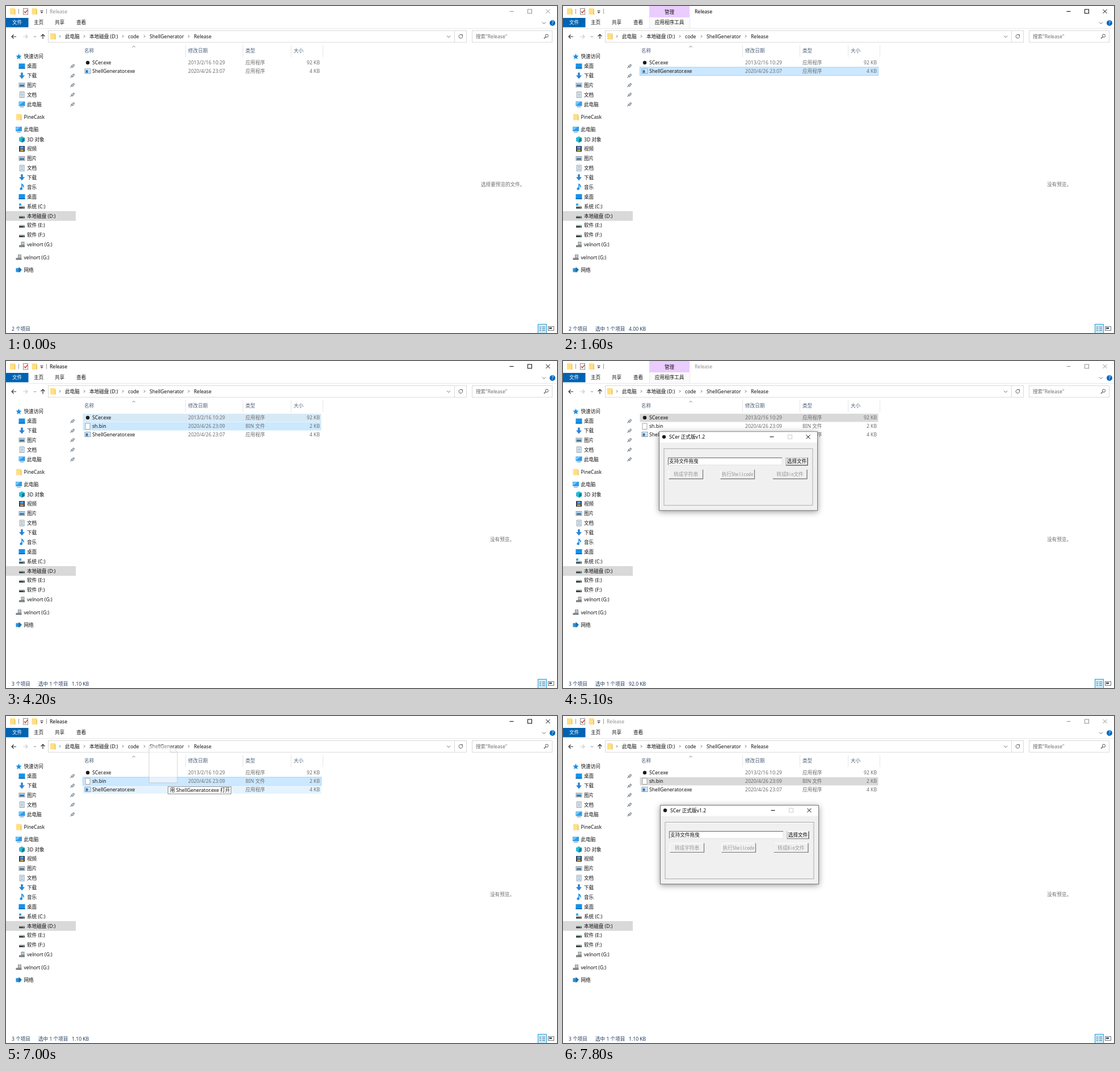
Write an HTML page that moves like this. It is 971 by 577 pixels and loops after 8 s.

```html
<!DOCTYPE html>
<html lang="zh-CN">
<head>
<meta charset="utf-8">
<title>Release</title>
<style>
html, body { margin: 0; width: 100%; height: 100%; overflow: hidden; background: #fff; }
svg { display: block; width: 971px; height: 577px; }
text { font: 8.6px "Noto Sans", "Noto Sans CJK SC", "Noto Sans CJK", sans-serif; fill: #111; }
.dim { fill: #6d6d6d; }
.head { fill: #4c607a; }
.stat { fill: #1e395b; }
.white { fill: #fff; }
.end { text-anchor: end; }
.mid { text-anchor: middle; }
.mono { font-family: "Noto Sans Mono CJK SC", "Noto Sans CJK SC", "Liberation Mono", monospace; }
.off { fill: #999; }
.cap { color: #000; }
.cap text { fill: currentColor; }
.idle .cap { color: #8f8f8f; }
.tiny text { font-size: 2.7px; }
.shadow { filter: drop-shadow(0 2.5px 5.5px rgba(0,0,0,.4)); }
</style>
</head>
<body>
<svg id="stage" viewBox="0 0 971 577"></svg>
<script>
const LOOP = 8000, STEP = 100;

// Drawing helpers; text y is the middle of the line
const text = (x, y, s, cls = '') => `<text x="${x}" y="${y + 3.1}" class="${cls}">${s}</text>`;
const rect = (x, y, w, h, fill, stroke = 'none', width = 1) =>
  `<rect x="${x}" y="${y}" width="${w}" height="${h}" fill="${fill}" stroke="${stroke}" stroke-width="${width}"/>`;
const path = (d, stroke, width = 1, fill = 'none') =>
  `<path d="${d}" stroke="${stroke}" stroke-width="${width}" fill="${fill}"/>`;
const dot = (x, y, r, fill) => `<circle cx="${x}" cy="${y}" r="${r}" fill="${fill}"/>`;
const at = (x, y, s) => `<g transform="translate(${x} ${y})">${s}</g>`;
// Shown only in the given spans: "from-to" or "from-to:opacity"
const during = (spans, s) => `<g data-on="${spans}">${s}</g>`;

let seed = 7;
const rnd = () => (seed = (seed * 16807) % 2147483647) / 2147483647;

const drive = rect(-5, -1, 10, 2, '#c4c8ca') + rect(-5, 1, 10, 3, '#3c4246') + rect(2, 2, 2, 1, '#5fe07a');
const screen = rect(-5.5, -5, 11, 8, '#2f9bea') + path('M-5 -4.5L3 -4.5L-5 2z', 'none', 0, '#73c8fa');
const icons = {
  folder: rect(-4.5, -5.5, 9, 11, '#ffdf85') + rect(3.5, -3.5, 1.5, 9, '#eec058'),
  star: path('M0 -5L1.5 -1.6L5 -1.3L2.4 1.2L3.2 5L0 3L-3.2 5L-2.4 1.2L-5 -1.3L-1.5 -1.6z', 'none', 0, '#1e8fe0'),
  desk: rect(-5.5, -4.5, 11, 9, '#1492ea') + rect(-5.5, 3, 11, 1.5, '#0b63ad'),
  down: path('M-1.8 -5.5H1.8V-.5H5L0 5.5L-5 -.5H-1.8z', 'none', 0, '#2b83d8'),
  pic: rect(-5, -3.5, 10, 7, '#fff', '#8a9299') + rect(-4, -2.5, 8, 3, '#7cbcf0') + rect(-4, 0, 8, 2.5, '#41667e'),
  doc: rect(-3.5, -5, 7.5, 10, '#fff', '#8b969e') + path('M-2 -2.5H2.5M-2 0H2.5M-2 2.5H2.5', '#5b93bd'),
  pc: screen + rect(-3.5, 4, 7, 1.2, '#7e98a8'),
  cube: path('M-5 -3L0 -5.5L5 -3V3L0 5.5L-5 3z', 'none', 0, '#27bcd8') + path('M0 -1L5 -3V3L0 5.5z', 'none', 0, '#127f9c'),
  film: rect(-5, -5, 10, 10, '#333d49') + rect(-3, -4, 6, 4, '#4f9ee8') + rect(-3, 1, 6, 3, '#c99c4d'),
  note: path('M0 2.5V-5Q3.5 -3 3 .5', '#148de8', 1.6) + dot(-1.3, 3, 2.3, '#148de8'),
  drive,
  sys: drive + rect(-5, -5, 4, 3.5, '#2aa9ea'),
  usb: rect(-5, 1, 10, 3.5, '#7d8285') + rect(-1, -4.5, 5, 5, '#c5c9cc', '#8a8f92'),
  net: rect(-5, -3, 8, 7, '#2d8fd5') + path('M0 -5L5.5 0L0 5z', 'none', 0, '#1670b3'),
  page: rect(-4, -5, 8, 10.5, '#fff', '#a5a5a5'),
  app: rect(-5, -4, 10, 8, '#fff', '#7f95a8') + rect(-3.5, -2, 4, 5, '#2279c4') + rect(1.5, -2, 2, 5, '#b6d4ec'),
  tool: dot(0, 0, 3.2, '#1b1b1b')
};
const icon = (name, x, y) => at(x, y, icons[name]);

// Sidebar: indent level, icon, label, y, pinned
const side = [
  [0, 'star', '快速访问', 89], [1, 'desk', '桌面', 106, 1], [1, 'down', '下载', 123, 1], [1, 'pic', '图片', 139.5, 1],
  [1, 'doc', '文档', 156.5, 1], [1, 'pc', '此电脑', 173.5, 1], [0, 'folder', 'PineCask', 196], [0, 'pc', '此电脑', 218],
  [1, 'cube', '3D 对象', 235.5], [1, 'film', '视频', 252], [1, 'pic', '图片', 269], [1, 'doc', '文档', 286],
  [1, 'down', '下载', 302.5], [1, 'note', '音乐', 319.5], [1, 'desk', '桌面', 336.5], [1, 'sys', '系统 (C:)', 353.5],
  [1, 'drive', '本地磁盘 (D:)', 370.5], [1, 'drive', '软件 (E:)', 387], [1, 'drive', '软件 (F:)', 404],
  [1, 'usb', 'velnort (G:)', 421], [0, 'usb', 'velnort (G:)', 443.5], [0, 'net', '网络', 465.5]
];
const pin = path('M-3.5 3.5L-1 1M-2.5 -.5L1 2.8M-1 0L2 -3L3.5 -1.5L.8 1.8', '#87929c', 1.4);
const sidebar = rect(0, 362, 123, 17, '#d9d9d9') + side.map(([lvl, ic, label, y, pinned]) =>
  icon(ic, lvl ? 28 : 22.5, y) + text(lvl ? 37 : 31.5, y, label) + (pinned ? at(117, y, pin) : '')).join('');

const crumbs = [[104, '此电脑'], [147, '本地磁盘 (D:)'], [215, 'code'], [253, 'ShellGenerator'], [331, 'Release']];
const chevron = (x, y) => path(`M${x - 3} ${y - 1.5}L${x} ${y + 1.5}L${x + 3} ${y - 1.5}`, '#666');
const buttons = (x, y, gap, mid = 'currentColor') =>
  path(`M${x - 3.5} ${y}H${x + 3.5}M${x + 2 * gap - 3.5} ${y - 3.5}l7 7m0 -7l-7 7`, 'currentColor') +
  rect(x + gap - 3.5, y - 3.5, 7, 7, 'none', mid);

const frame = rect(0, 0, 971, 577, '#fff') +
  icon('folder', 11.5, 9.5) + path('M22.5 5V14M71.5 5V14', '#999') +
  rect(30.5, 4.5, 8, 10.5, '#fff', '#8a8a8a') + path('M32 9.5L34 12L38 7', '#d0472e', 1.5) +
  icon('folder', 50, 9.5) + path('M60.5 8.5H65.5', '#333') + path('M60.5 10.5H65.5L63 13z', 'none', 0, '#333') +
  `<g class="cap">${buttons(891, 9.5, 32)}</g>` +
  rect(0, 21, 39.5, 16.5, '#0063b1') + text(11, 29, '文件', 'white') +
  text(49, 29, '主页') + text(86, 29, '共享') + text(124, 29, '查看') +
  path('M0 39.5H971', '#e6e7e8') + chevron(948, 30) + dot(963, 30, 5, '#0067c0') + text(963, 30, '?', 'white mid') +
  path('M18 54H10M13.5 50.5L10 54L13.5 57.5', '#333', 1.2) + path('M30 54H38M34.5 50.5L38 54L34.5 57.5', '#ccc', 1.2) +
  path('M49 53L51 55L53 53', '#888') + path('M65 58V50M61.5 53.5L65 50L68.5 53.5', '#333', 1.2) +
  rect(74.5, 43.5, 737, 20.5, '#fff', '#d9d9d9') + path('M790.5 44V64', '#d9d9d9') + icon('folder', 82.5, 53.5) +
  crumbs.map(([x, s]) => path(`M${x - 10} 51.5L${x - 8} 53.5L${x - 10} 55.5`, '#555') + text(x, 53.5, s)).join('') +
  chevron(780, 54) + path('M804 52A3.2 3.2 0 1 1 801 50.5M801 50.5H804.3V53', '#555') +
  rect(821.5, 43.5, 141, 20.5, '#fff', '#d9d9d9') + text(828, 53.5, '搜索"Release"', 'dim') +
  `<circle cx="953" cy="52.5" r="2.6" fill="none" stroke="#555"/>` + path('M951 54.5L948 57.5', '#555', 1.2) +
  path('M222.5 73L225 70.5L227.5 73', '#777') + path('M316.5 69V90M417.5 69V90M502.5 69V90M558.5 69V90', '#e5e5e5') +
  text(138, 79, '名称', 'head') + text(321, 79, '修改日期', 'head') + text(422, 79, '类型', 'head') + text(507, 79, '大小', 'head') +
  sidebar +
  rect(937.5, 561.5, 15, 16, '#cdeaf8', '#26a0da') + path('M940 566.5H943M940 569.5H943M940 572.5H943M945 566.5H950M945 569.5H950M945 572.5H950', '#55788d') +
  rect(955.5, 565.5, 10, 7, '#fff', '#777') + rect(957, 567, 5, 3, '#44627c');

// File list
const rowY = n => 85 + n * 15 - (n > 2 ? .5 : 0);
const mark = (n, fill, stroke) => rect(135.5, rowY(n) - 7, 420, 14.5, fill, stroke);
const hover = n => mark(n, '#e5f3ff'), chosen = n => mark(n, '#cce8ff', '#99d1ff'), stale = n => mark(n, '#d9d9d9');
const file = (n, ic, name, date, type, size) => icon(ic, 144, rowY(n)) + text(152, rowY(n), name) +
  text(321, rowY(n), date, 'dim') + text(422, rowY(n), type, 'dim') + text(553, rowY(n), size, 'dim end');
const generator = n => file(n, 'app', 'ShellGenerator.exe', '2020/4/26 23:07', '应用程序', '4 KB');

const list =
  during('2400-2800 3900-4000:.6 4000-4200', hover(1)) + during('2800-2900', mark(1, '#f7f7f7')) +
  during('4200-4300', mark(1, '#d8e9f6')) + during('4300-4600', chosen(1)) + during('4600-5600', stale(1)) +
  during('1000-1300 2400-3300', hover(2)) + during('3300-4300', mark(2, '#cce8ff')) +
  during('1300-2400 5700-7400', chosen(2)) + during('7400-8000', stale(2)) +
  during('2400-3300 5700-6200', chosen(3)) + during('7000-7700', hover(3)) +
  file(1, 'tool', 'SCer.exe', '2013/2/16 10:29', '应用程序', '92 KB') +
  during('0-2400', generator(2)) +
  during('2400-8000', file(2, 'page', 'sh.bin', '2020/4/26 23:09', 'BIN 文件', '2 KB') + generator(3));

const picked = (n, size) => text(57, 569.5, `选中 ${n} 个项目`, 'stat') + text(116, 569.5, size, 'stat');
const status = during('0-2400', text(10, 569.5, '2 个项目', 'stat')) + during('2400-8000', text(10, 569.5, '3 个项目', 'stat')) +
  during('1300-3300', picked(1, '4.00 KB')) + during('3300-4300 6300-8000', picked(1, '1.10 KB')) +
  during('4300-5900', picked(1, '92.0 KB')) + during('5900-6300', picked(2, '5.10 KB'));

const title = x => `<g class="cap">${text(x, 9.5, 'Release')}</g>`;
const titles = during('0-1400 3400-4300 6400-8000', title(77)) +
  during('1400-3400 4300-6400', rect(152, 0, 71, 20, '#eaccff') + rect(152, 20, 71, 18.5, '#fafafa') +
    path('M152.5 20V39M223.5 20V39', '#ececec') + text(187.5, 10.5, '管理', 'mid') + text(187.5, 29, '应用程序工具', 'mid') + title(232));

const preview = during('0-1400', text(837, 315, '选择要预览的文件。', 'dim')) + during('1400-8000', text(853, 315, '没有预览。', 'dim'));

const tip = rect(264.5, 122.5, 113, 39, '#fff', '#cfcfcf') + text(267, 130, '类型: BIN 文件', 'dim') +
  text(267, 142, '大小: 1.10 KB', 'dim') + text(267, 154, '修改日期: 2020/4/26 23:09', 'dim');
// Dragged file with its drop hint
const dragged = `<g opacity=".5">${path('M266 61H304L316 73V127H266z', '#aaa', 1, '#fff') + path('M304 61V73H316', '#aaa')}</g>` +
  rect(299.5, 133.5, 111, 13, '#fff', '#8a8a8a') + text(303, 140, '用 ShellGenerator.exe 打开');

// Tool dialog
const push = (x, y, w, h, label, cls, edge) => rect(x, y, w, h, '#f0f0f0', edge) +
  path(`M${x} ${y + h}V${y}H${x + w}`, '#fff') + path(`M${x} ${y + h}H${x + w}V${y}`, '#777', 1.2) +
  text(x + w / 2, y + h / 2, label, cls + ' mono mid');
const dialog = rect(171.5, 157.5, 279, 139, '#f0f0f0', '#777') + rect(172, 158, 278, 18.5, '#fff') +
  icon('tool', 180, 166.5) + `<g class="cap">${text(189, 166.5, 'SCer 正式版v1.2') + buttons(370, 166.5, 32, '#ccc')}</g>` +
  rect(180.5, 188.5, 262, 100, 'none', '#fff') + rect(180, 187.5, 262, 100, 'none', '#a5a5a5') +
  rect(187, 203.5, 201, 12.5, '#fff', '#e3e3e3') + path('M187.5 216V203.5H388', '#666') + text(189, 209.5, '支持文件拖曳', 'mono') +
  push(395, 203.5, 38, 13, '选择文件', '', '#444') + push(188.5, 224.5, 60, 16, '转成字符串', 'off', '#ccc') +
  push(279.5, 224.5, 60, 16, '执行Shellcode', 'off', '#ccc') + push(372, 224.5, 60, 16, '转成Bin文件', 'off', '#ccc');

// Task switcher
const words = 'int main void return buffer size file open read write shell code list item byte';
const lines = (x, y, n, dy, max, fill) => Array.from({ length: n }, (_, i) => {
  const from = Math.floor(rnd() * 30), len = Math.floor(max * (.4 + .6 * rnd()));
  return `<text x="${x}" y="${(y + i * dy).toFixed(1)}" style="fill:${fill}">${words.substr(from, len)}</text>`;
}).join('');
const label = (x, y, s, ic = 1) => (ic ? rect(x - 20, y - 6, 14, 12, '#f4f4f4') + rect(x - 18, y - 3, 5, 8, '#4c8f7d') : '') + text(x, y, s, 'white');
const mini = (x, y) => `<use href="#shell" transform="translate(${x} ${y}) scale(.2515)"/>`;
const tiny = s => `<g class="tiny">${s}</g>`;
const columns = (x, y, n, date, fill) => lines(x, y, n, 4.1, 30, fill) +
  lines(x + date, y, n, 4.1, 14, '#555') + lines(x + date + 23, y, n, 4.1, 9, '#555') + lines(x + date + 44, y, n, 4.1, 4, '#555');

const coder = rect(598, 32, 216, 146, '#1e1e1e') + rect(598, 32, 216, 10, '#2d2d30') + rect(598, 42, 57, 133, '#252526') +
  rect(671, 42, 17, 3.5, '#007acc') + rect(656, 113, 158, 3, '#2d2d30') +
  rect(809, 42, 2, 70, '#3e3e42') + rect(598, 174.5, 216, 3.5, '#007acc') +
  tiny(lines(601, 36, 2, 4, 70, '#ccc') + lines(601, 47, 10, 4.3, 22, '#bbb') + lines(668, 54, 10, 4, 62, '#7f9f6d') +
    lines(658, 120, 13, 4.2, 30, '#ccc') + lines(700, 120, 5, 4.2, 76, '#ddd'));
const spots = [121, 138, 155, 172, 189];
const tints = ['#444', '#4285f4', '#555', '#333', '#3b9ae0', '#333', '#c0713a', '#e5402f', '#4aa564', '#999'];
const browser = rect(64, 209, 183, 146, '#fff') + rect(64, 209, 183, 7, '#dee1e6') + rect(66, 210.5, 36, 5.5, '#fff') +
  rect(78, 217, 100, 4, '#f1f3f4') + path('M64 226.5H247', '#eee', .5) +
  dot(155, 257, 7, '#4285f4') + `<rect x="113" y="269" width="85" height="9" rx="4.5" fill="#fff" stroke="#ddd" stroke-width=".7"/>` +
  tints.map((c, i) => dot(spots[i % 5], i < 5 ? 288 : 307, 2.3, c)).join('') +
  rect(230, 347, 14, 5, '#fff', '#ddd') +
  tiny(lines(67, 214, 1, 4, 30, '#555') + lines(80, 220, 1, 4, 40, '#555') + lines(66, 225, 1, 4, 70, '#666') + lines(121, 274.5, 1, 4, 26, '#888') +
    spots.map(x => lines(x - 4, 296.5, 2, 19, 9, '#666')).join(''));
const article = rect(0, 209, 55, 146, '#fff') + rect(0, 231, 48, 92, '#141c2b') + rect(0, 283, 48, 2, '#245c94') +
  rect(0, 319.5, 48, 3, '#0b6fc0') + tiny(lines(1, 214, 4, 4.5, 26, '#666') + lines(1, 240, 18, 4.2, 30, '#8193a8') + lines(1, 330, 5, 4.5, 26, '#666'));

const switcher = rect(0, 0, 832.5, 374, 'rgba(10,10,10,.8)') +
  `<clipPath id="left"><rect y="32" width="45" height="146"/></clipPath><g clip-path="url(#left)">${mini(-200, 32)}${tiny(lines(9, 111, 1, 4, 14, '#666'))}</g>` +
  rect(50, 9, 285.5, 171.5, 'none', '#fff', 2) +
  label(73, 20.5, 'SCer 正式版v1.2') + `<g class="idle">${at(-118.5, -125.5, dialog)}</g>` +
  label(363, 20.5, 'Frame 37 Delay 0.1') + rect(341, 37, 236, 141, 'rgba(0,0,0,.08)') + rect(341, 31, 249, 6.5, '#fff') +
  rect(577, 31, 13, 147, '#fff') + tiny([42, 49, 57, 64].map(y => rect(578.5, y - 3, 10, 4.5, '#e6e9ee') + lines(580, y, 1, 4, 7, '#444')).join('')) +
  label(618, 20.5, 'ShellGenerator - Halvorn Pattern Workshop(...') + coder +
  text(0, 198, 'de.md...', 'white') + article +
  dot(72, 198, 7.5, '#ea4335') + label(84, 198, '新标签页 - Tarvel Quartz', 0) + browser +
  label(276, 198, '_posts') + mini(256, 209) + rect(290, 232, 157, 3.5, '#d9d9d9') + rect(447.5, 228, 2.5, 78, '#cdcdcd') +
  tiny(columns(294, 235, 29, 63, '#5a2626') + lines(469, 289, 1, 4, 14, '#888')) +
  label(529, 198, 'ShellGenerator') + mini(509, 209) +
  tiny(columns(547, 235, 4, 45, '#333') + lines(719, 289, 1, 4, 22, '#888'));

const stage = document.getElementById('stage');
stage.innerHTML = `<g id="win"><g id="shell">${frame}</g>${titles}${list}${preview}${status}</g>` +
  during('2800-2900:.15 2900-3000:.5 3000-3100:.8 3100-3300', tip) +
  during('5600-6500', '<rect id="band" x="267.5" y="113.5" fill="rgba(0,120,215,.36)" stroke="#0078d7"/>') +
  during('4500-4600:.4 4600-4700:.8 4700-5600 5600-5700:.3 5700-5900:.03 7400-8000', `<g id="tool" class="shadow">${dialog}</g>`) +
  during('7000-7700 7700-7800:.3', `<g id="cargo">${dragged}</g>`) +
  during('7200-7400', switcher);

const parse = spans => spans.split(' ').map(s => s.split(/[-:]/).map(Number));
const level = (spans, t) => {
  const hit = spans.find(([a, b]) => t >= a && t < b);
  return hit ? hit[2] ?? 1 : 0;
};
const tracks = [...stage.querySelectorAll('[data-on]')].map(el => [el, parse(el.dataset.on)]);
const idle = parse('0-1300 4600-5600 7400-8000');
const [win, band, tool, cargo] = ['win', 'band', 'tool', 'cargo'].map(id => document.getElementById(id));

// Motion keys: time, x, y
const bandSize = [[5600, 3, 7], [5700, 12, 26], [5800, 19.5, 41], [5900, 17, 36], [6200, 5, 6]];
const toolShift = [[5000, -3, -49], [5300, 0, 0]];
const cargoShift = [[7000, -14, -9], [7200, 0, 0]];

function along(keys, t) {
  const i = keys.findLastIndex(k => k[0] <= t);
  if (i < 0) return keys[0].slice(1);
  const a = keys[i], b = keys[i + 1] || a;
  const k = b === a ? 0 : (t - a[0]) / (b[0] - a[0]);
  return [a[1] + (b[1] - a[1]) * k, a[2] + (b[2] - a[2]) * k];
}
const shift = (el, keys, t) => el.setAttribute('transform', `translate(${along(keys, t)})`);

function draw() {
  const t = Math.floor(performance.now() % LOOP / STEP) * STEP;
  for (const [el, spans] of tracks) {
    const v = level(spans, t);
    el.style.display = v ? '' : 'none';
    el.style.opacity = v;
  }
  win.classList.toggle('idle', level(idle, t) > 0);
  const [w, h] = along(bandSize, t);
  band.setAttribute('width', w);
  band.setAttribute('height', h);
  shift(tool, toolShift, t);
  shift(cargo, cargoShift, t);
  requestAnimationFrame(draw);
}
draw();
</script>
</body>
</html>
```
